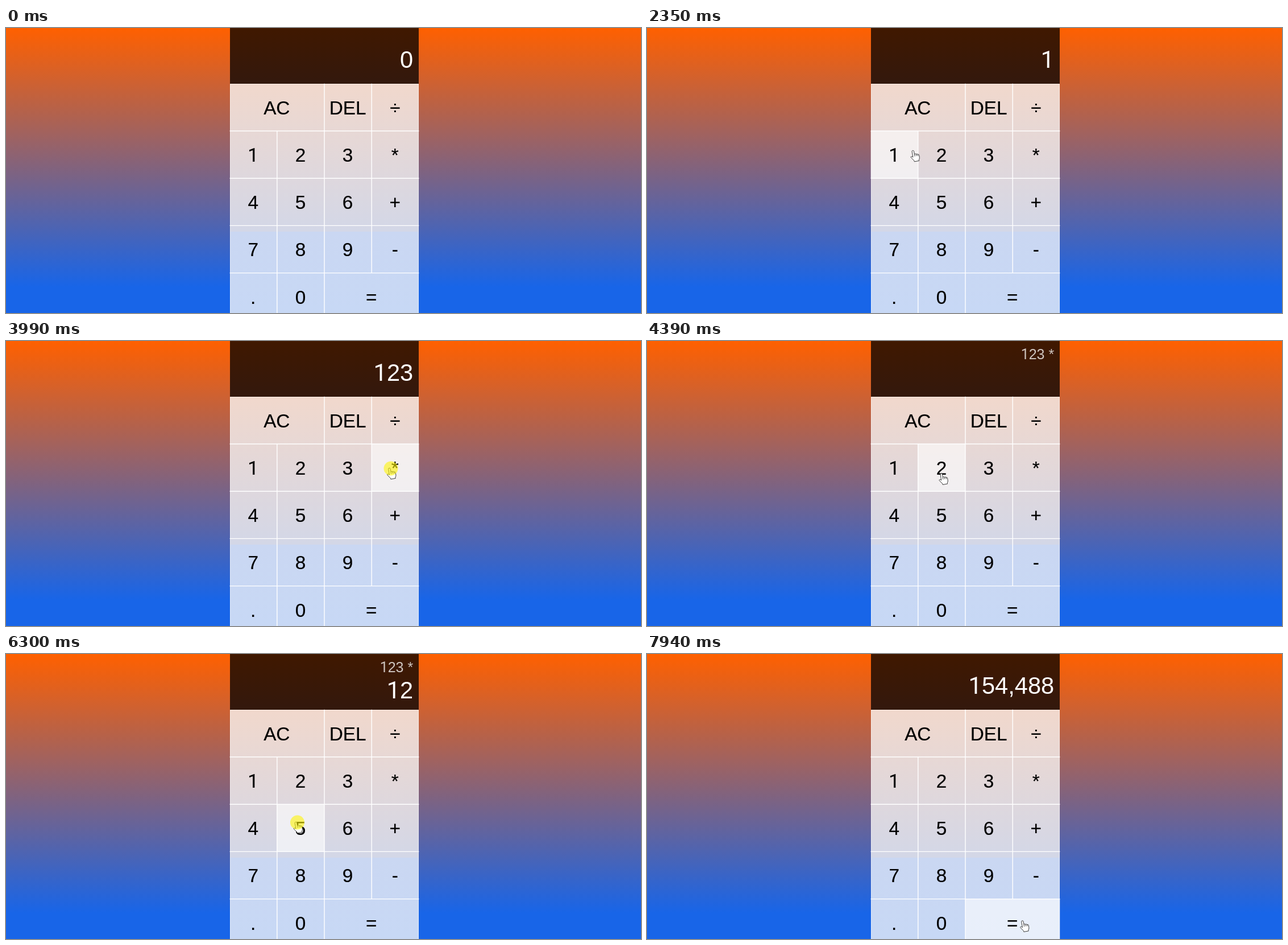
An HTML page for the animation above (8000 ms loop, 1117 by 501 pixels).

```html
<!DOCTYPE html>
<html lang="en">
<head>
<meta charset="utf-8">
<title>Calculator</title>
<style>
  html, body { margin: 0; width: 100%; height: 100%; overflow: hidden; }
  svg { display: block; width: 1117px; height: 501px; font-family: "Liberation Sans", Arial, sans-serif; }
  .key { font-size: 33.3px; text-anchor: middle; stroke: #000; stroke-width: .2; }
  .out { fill: #fff; text-anchor: end; white-space: pre; }
  .one { font-family: Roboto, sans-serif; }
</style>
</head>
<body>
<svg viewBox="0 0 1117 501">
  <defs>
    <linearGradient id="sky" x2="0" y2="1">
      <stop stop-color="#ff6000"/>
      <stop offset=".908" stop-color="#1865e8"/>
    </linearGradient>
    <linearGradient id="screen" x2="0" y2="1">
      <stop stop-color="#401800"/>
      <stop offset="1" stop-color="#33180d"/>
    </linearGradient>
    <linearGradient id="pad" x2="0" y2="1">
      <stop stop-color="#f1d8cc"/>
      <stop offset=".644" stop-color="#d3d7e7"/>
      <stop offset=".644" stop-color="#cad7f2"/>
      <stop offset="1" stop-color="#c7d8f5"/>
    </linearGradient>
  </defs>
  <rect width="1117" height="501" fill="url(#sky)"/>
  <rect x="394" width="332" height="98" fill="url(#screen)"/>
  <rect x="394" y="98" width="332" height="403" fill="url(#pad)"/>
  <rect id="hover" fill="#fff" fill-opacity=".6"/>
  <path id="lines" fill="none" stroke="#fff" stroke-width="1.4"/>
  <path d="M394.5 501V98.5H725.5V501" fill="none" stroke="#fff" stroke-opacity=".5"/>
  <g id="keys"></g>
  <text id="prev" class="out" x="716.2" y="32" font-size="25" fill-opacity=".75"></text>
  <text id="curr" class="out" x="716.2" font-size="41.6"></text>
  <g id="pointer">
    <g transform="translate(-2.5 0) rotate(-10)" stroke="#333" stroke-width=".9" stroke-linejoin="round">
      <path fill="#fff" d="M-2 1Q-2-.7-.3-.7T1.4 1V6q2.6-.8 2.9.7 2.4-.6 2.7.8 2.2-.3 2.2 1.6V13q0 2.5-1.7 4.2V19H-1V17.3L-5.4 11.2q-.9-1.6.6-2 1.3-.2 2.8 1.8Z"/>
      <path fill="none" d="M1.4 6v4M4.3 6.7V10M7 7.5v2.8"/>
    </g>
    <circle id="press" r="12.5" fill="#fff500" fill-opacity=".58"/>
  </g>
</svg>
<script>
const LOOP = 8000, TICK = 69, PRESS = 70;
const LEFT = 393.6, TOP = 97.8, CELL = 83.2;
const $ = id => document.getElementById(id);

// a label that repeats spans both columns
const layout = ['AC AC DEL ÷', '1 2 3 *', '4 5 6 +', '7 8 9 -', '. 0 = ='].map(row => row.split(' '));

// the pointer's route; a stop with a press time clicks the key beneath it
const route = [
  { at: 450, x: 336, y: 494 },
  { at: 930, x: 399, y: 262 },
  { at: 1210, x: 393, y: 220 },
  { at: 1480, x: 432, y: 216, press: 2010 },
  { at: 2500, x: 510, y: 216, press: 2700 },
  { at: 3380, x: 598, y: 222, press: 3510 },
  { at: 3790, x: 677, y: 224, press: 3990 },
  { at: 4460, x: 450, y: 238, press: 4660 },
  { at: 5210, x: 480, y: 250 },
  { at: 5350, x: 516, y: 244, press: 5810 },
  { at: 6230, x: 512.5, y: 296, press: 6300 },
  { at: 6580, x: 596, y: 300, press: 6720 },
  { at: 7070, x: 662, y: 378 },
  { at: 7600, x: 663, y: 469.5, press: 7870 }
];
const clicks = route.filter(stop => stop.press);

function setAttrs(el, attrs) {
  for (const name in attrs) el.setAttribute(name, attrs[name]);
}

// a numeral one without a foot
function setText(el, text) {
  el.innerHTML = text.replace(/1/g, '<tspan class="one">1</tspan>');
}

function keyAt(col, row) {
  const labels = layout[row];
  const label = labels?.[col];
  if (!label) return null;
  const first = labels.indexOf(label);
  const span = labels.lastIndexOf(label) - first + 1;
  return { label, x: LEFT + CELL * first, y: TOP + CELL * row, width: CELL * span };
}

// the hot spot lies a little beside the fingertip
function keyUnder({ x, y }) {
  return keyAt(Math.floor((x - 4 - LEFT) / CELL), Math.floor((y + 3 - TOP) / CELL));
}

function buildKeys() {
  let d = '';
  layout.forEach((labels, row) => labels.forEach((label, col) => {
    if (labels.indexOf(label) < col) return;
    const { x, y, width } = keyAt(col, row);
    const text = document.createElementNS('http://www.w3.org/2000/svg', 'text');
    setAttrs(text, { class: 'key', x: x + width / 2 - 0.5, y: y + 53.9 });
    setText(text, label);
    $('keys').append(text);
    if (col) d += `M${x} ${y}v${CELL}`;
    if (row) d += `M${x} ${y}h${width}`;
  }));
  $('lines').setAttribute('d', d);
}

function tipAt(t) {
  const i = route.findLastIndex(stop => stop.at <= t);
  const a = route[i], b = route[i + 1];
  const start = a.press ? a.press + PRESS : a.at;
  if (!b || t < start) return a;
  const k = Math.floor((t - start) / TICK) * TICK / (b.at - start);
  return { x: a.x + (b.x - a.x) * k, y: a.y + (b.y - a.y) * k };
}

function drawPointer(t) {
  const tip = t >= route[0].at && tipAt(t);
  const key = tip && keyUnder(tip);
  $('pointer').style.display = tip ? '' : 'none';
  $('hover').style.display = key ? '' : 'none';
  if (tip) $('pointer').setAttribute('transform', `translate(${tip.x} ${tip.y})`);
  if (key) setAttrs($('hover'), { x: key.x, y: key.y, width: key.width, height: CELL });
  const pressed = clicks.some(({ press }) => t >= press && t < press + PRESS);
  $('press').style.display = pressed ? '' : 'none';
}

function drawDisplay(t) {
  const typed = clicks.filter(({ press }) => t >= press + PRESS).map(stop => keyUnder(stop).label).join('');
  const [, a, op, b, equals] = /^(\d*)(\*?)(\d*)(=?)/.exec(typed);
  const format = n => Number(n).toLocaleString('en-US');
  const pending = op && !equals;
  const curr = equals ? format(a * b) : op ? b && format(b) : format(a);
  setText($('curr'), curr);
  setText($('prev'), pending ? `${format(a)} ${op}` : '');
  $('curr').setAttribute('y', pending ? 77.5 : 70.2);
}

function frame() {
  const t = performance.now() % LOOP;
  drawPointer(t);
  drawDisplay(t);
  requestAnimationFrame(frame);
}

buildKeys();
frame();
</script>
</body>
</html>
```
